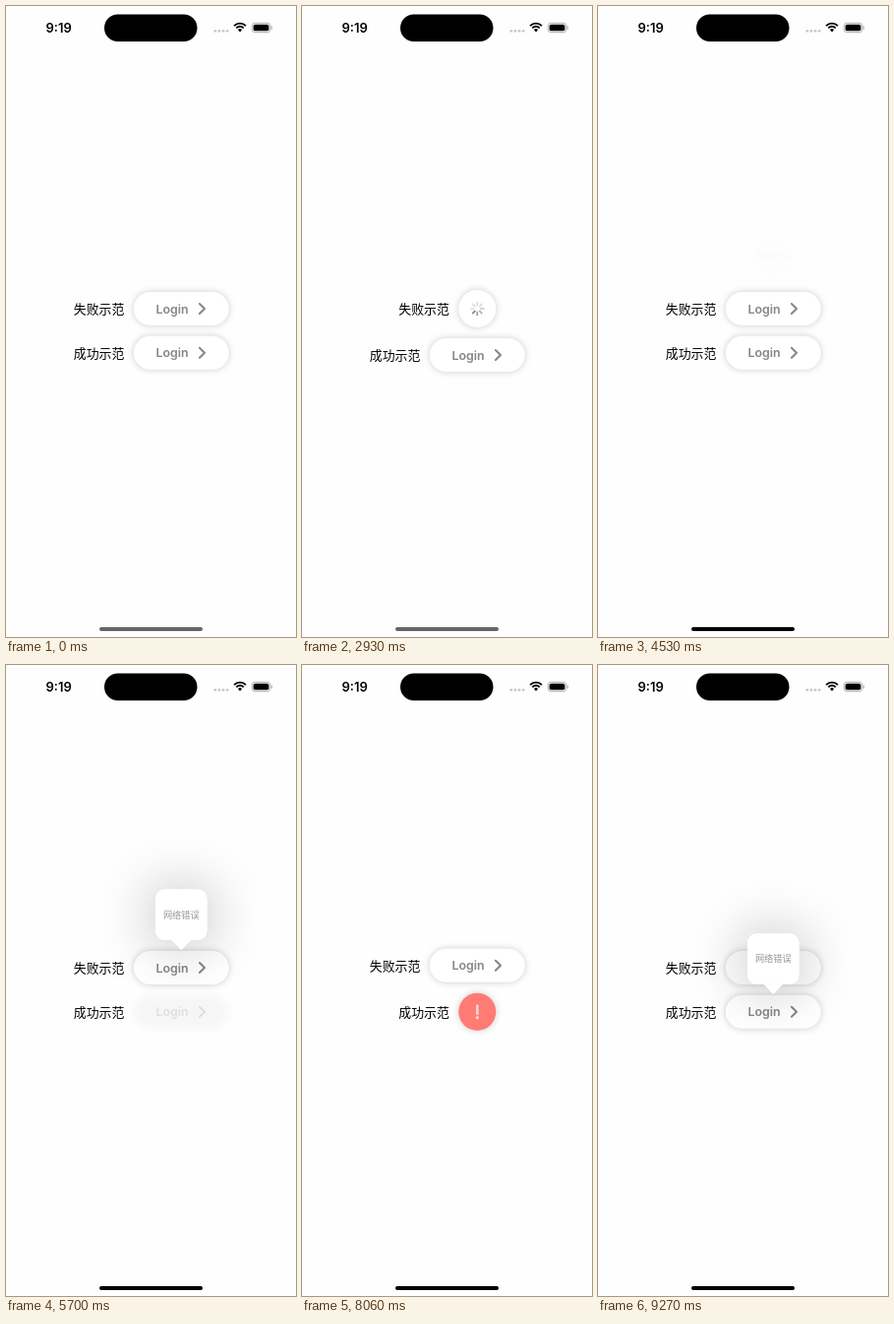
An HTML page with a canvas that plays this animation: 295 by 640 pixels, repeating every 9.94 s.

```html
<!DOCTYPE html>
<html lang="zh">
<head>
<meta charset="utf-8">
<style>
  html, body { margin: 0; width: 100%; height: 100%; overflow: hidden; background: #fefefe; }
  canvas { display: block; width: 295px; height: 640px; }
</style>
</head>
<body>
<canvas></canvas>
<script>
const LOOP = 9940, W = 295, H = 640, CX = 178.3;
const LATIN = 'Inter, Roboto, sans-serif';
const CJK = '"Noto Sans CJK SC", "Noto Sans CJK", sans-serif';

// Times in ms: press, turn red, expand again, show bubble, hide bubble.
const rows = [
  { label: '失败示范', y: 307, press: 1370, fail: 3480, expand: 4180, bubble: 4490, hide: 5780, head: 5, headAt: 2930 },
  { label: '成功示范', y: 351.8, press: 5700, fail: 7950, expand: 8735, bubble: 8930, hide: Infinity, head: 0, headAt: 6900 }
];

const canvas = document.querySelector('canvas');
const c = canvas.getContext('2d');
const dpr = window.devicePixelRatio || 1;
canvas.width = W * dpr;
canvas.height = H * dpr;

const clamp = x => Math.max(0, Math.min(1, x));
const ramp = (t, start, length) => clamp((t - start) / length);
const smooth = x => x * x * (3 - 2 * x);
const mix = (a, b, k) => a + (b - a) * k;
const spring = ms => ms <= 0 ? 0 : 1 - (1 + ms * 0.012) * Math.exp(-ms * 0.012);

function withAlpha(alpha, paint) {
  if (alpha <= 0) return;
  c.save();
  c.globalAlpha *= alpha;
  paint();
  c.restore();
}

function box(x, y, w, h, r, color) {
  c.fillStyle = color;
  c.beginPath();
  c.roundRect(x, y, w, h, r);
  c.fill();
}

function dot(x, y, r, color) {
  c.fillStyle = color;
  c.beginPath();
  c.arc(x, y, r, 0, 2 * Math.PI);
  c.fill();
}

function line(points, width, color) {
  c.strokeStyle = color;
  c.lineWidth = width;
  c.lineCap = c.lineJoin = 'round';
  c.beginPath();
  points.forEach(([x, y]) => c.lineTo(x, y));
  c.stroke();
}

function text(str, x, y, font, color, align = 'left') {
  c.font = font;
  c.fillStyle = color;
  c.textAlign = align;
  c.fillText(str, x, y);
}

function shadow(color, blur, dy = 0) {
  c.shadowColor = color;
  c.shadowBlur = blur * dpr;
  c.shadowOffsetY = dy * dpr;
}

function chrome(t) {
  text('9:19', 40.5, 26.8, `600 13px ${LATIN}`, '#000');
  box(100, 8.5, 94.5, 27.5, 13.75, '#000');
  for (let i = 0; i < 4; i++) dot(212.8 + i * 4.1, 25.3, 1.4, '#c8c8c8');

  c.strokeStyle = '#000';
  c.lineWidth = 1.9;
  c.lineCap = 'butt';
  for (const r of [8.4, 5.2]) {
    c.beginPath();
    c.arc(238, 26, r, -Math.PI * 0.75, -Math.PI * 0.25);
    c.stroke();
  }
  c.fillStyle = '#000';
  c.beginPath();
  c.moveTo(238, 26.6);
  c.arc(238, 26, 2.9, -Math.PI * 0.75, -Math.PI * 0.25);
  c.fill();

  c.strokeStyle = '#a8a8a8';
  c.lineWidth = 0.9;
  c.beginPath();
  c.roundRect(250.2, 17.3, 18.6, 9.4, 3);
  c.stroke();
  box(251.6, 18.7, 15.8, 6.6, 1.9, '#000');
  box(269.6, 20.3, 1.1, 3.4, 0.6, '#a8a8a8');

  const gray = Math.round(mix(102, 0, ramp(t, 3480, 500)));
  box(95, 630, 105, 4, 2, `rgb(${gray},${gray},${gray})`);
}

function spinner(x, y, row, t) {
  const head = row.head + Math.floor((t - row.headAt) / 125 + 0.5);
  for (let i = 0; i < 8; i++) {
    const age = (((head - i) % 8) + 8) % 8;
    const angle = i * Math.PI / 4;
    const dx = Math.sin(angle), dy = -Math.cos(angle);
    const shade = Math.round(Math.min(220, 135 + age * 21));
    line([[x + dx * 3.4, y + dy * 3.4], [x + dx * 6.5, y + dy * 6.5]], 1.7,
      `rgb(${shade},${shade},${shade})`);
  }
}

function collapse(row, t) {
  const closed = spring(t - row.press - 90);
  return closed * (1 - smooth(ramp(t, row.expand, 220)));
}

function drawRow(row, y, t) {
  const k = collapse(row, t);
  const red = smooth(ramp(t, row.fail, 180)) * (1 - smooth(ramp(t, row.expand, 200)));
  const shakeAt = t - row.fail - 142;
  const shake = shakeAt > 0 && t < row.expand ? 4.1 * Math.sin(shakeAt / 180 * 2 * Math.PI) : 0;
  const x = CX + shake;
  const w = mix(97, 38, k), h = mix(34, 38, k);

  text(row.label, mix(68.8, 98.3, k), y + 4.7, `400 12.9px ${CJK}`, '#000');

  const pressed = t >= row.press && t < row.press + 500;
  const opacity = pressed ? mix(0.2, 1, ramp(t, row.press + 100, 250)) : 1;
  withAlpha(opacity, () => {
    c.save();
    shadow('rgba(0,0,0,0.2)', 7);
    const green = Math.round(mix(255, 59, red)), blue = Math.round(mix(255, 48, red));
    box(x - w / 2, y - h / 2, w, h, h / 2, `rgb(255,${green},${blue})`);
    c.restore();

    withAlpha(clamp(1 - k * 1.8), () => {
      text('Login', x - 25.9, y + 4.6, `600 12.4px ${LATIN}`, '#868686');
      line([[x + 18.6, y - 5], [x + 23.7, y], [x + 18.6, y + 5]], 2, '#868686');
    });
    if (t > row.press && t < row.expand)
      withAlpha(clamp(k * 2 - 1) * (1 - ramp(t, row.fail, 120)), () => spinner(x, y, row, t));
    withAlpha(red, () => {
      line([[x, y - 6.3], [x, y + 2]], 2.6, '#fff');
      dot(x, y + 6, 1.7, '#fff');
    });
  });
}

function drawBubble(row, t) {
  const alpha = smooth(ramp(t, row.bubble, 340)) * (1 - smooth(ramp(t, row.hide, 350)));
  const top = row.y - 79.5;
  withAlpha(alpha, () => {
    c.save();
    shadow('rgba(0,0,0,0.32)', 56, 2);
    c.fillStyle = '#fff';
    c.beginPath();
    c.roundRect(152, top, 52.5, 51.5, 9.5);
    c.moveTo(166, top + 51);
    c.quadraticCurveTo(169, top + 51.5, 171, top + 54);
    c.lineTo(176.8, top + 60.5);
    c.quadraticCurveTo(CX, top + 62, 179.8, top + 60.5);
    c.lineTo(185.6, top + 54);
    c.quadraticCurveTo(187.6, top + 51.5, 190.6, top + 51);
    c.lineTo(190.6, top + 45);
    c.lineTo(166, top + 45);
    // Same winding as the box keeps the two parts joined.
    c.fill('nonzero');
    c.restore();
    box(152, top, 52.5, 51.5, 9.5, '#fff');
    text('网络错误', CX, top + 29, `400 9.2px ${CJK}`, '#969696', 'center');
  });
}

function draw(t) {
  c.setTransform(dpr, 0, 0, dpr, 0, 0);
  c.fillStyle = '#fefefe';
  c.fillRect(0, 0, W, H);
  chrome(t);
  drawRow(rows[0], rows[0].y - 2.2 * collapse(rows[1], t), t);
  drawRow(rows[1], rows[1].y + 2.2 * collapse(rows[0], t), t);
  rows.forEach(row => drawBubble(row, t));
}

function tick() {
  draw(performance.now() % LOOP);
  requestAnimationFrame(tick);
}
tick();
</script>
</body>
</html>
```
